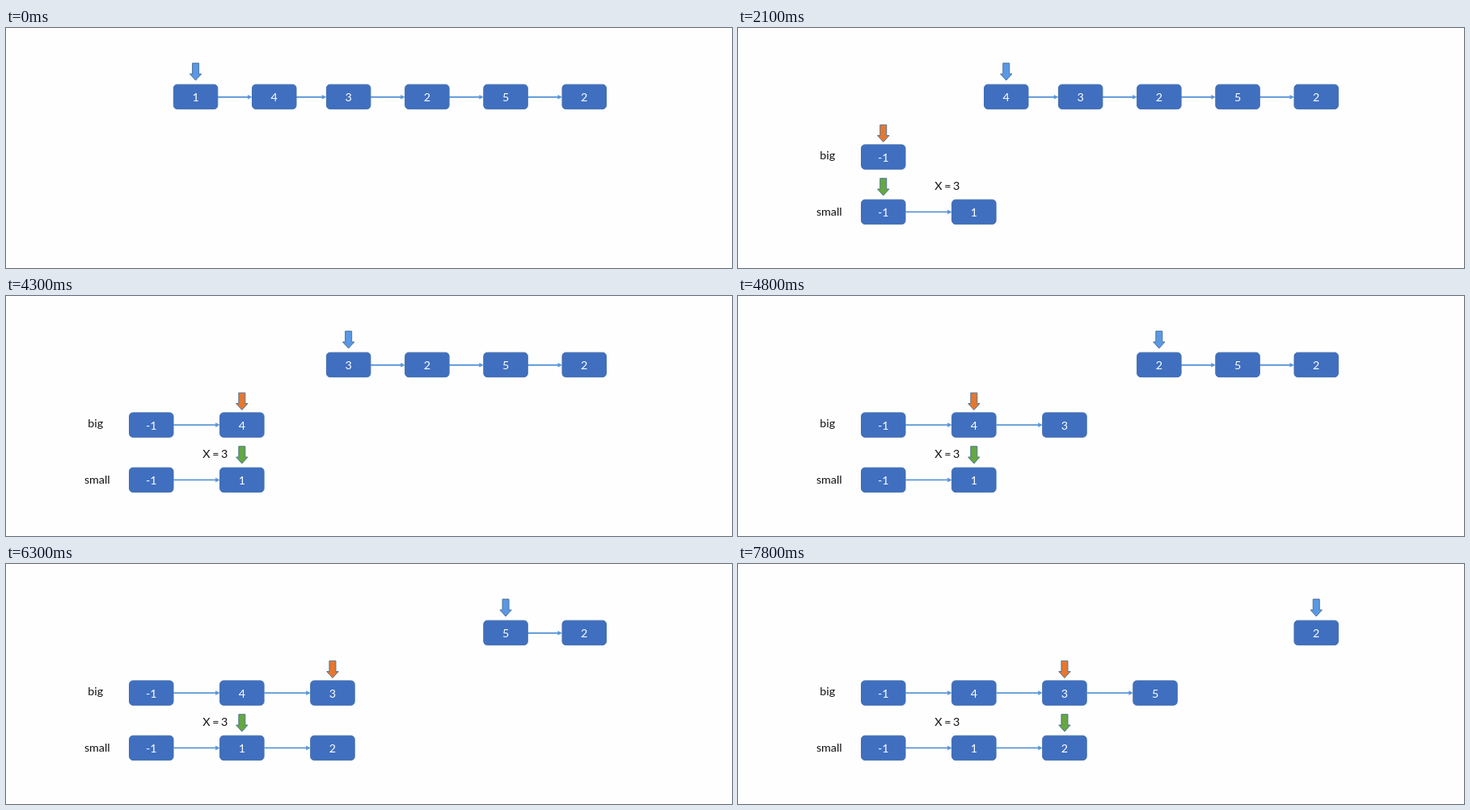
An HTML page that plays this animation: 898 px wide and 298 px high, repeating every 8 s.

```html
<!DOCTYPE html>
<html lang="en">
<head>
<meta charset="utf-8">
<title>Partition list</title>
<style>
  html, body { margin: 0; width: 100%; height: 100%; overflow: hidden; background: #fefefe; }
  svg { display: block; width: 898px; height: 298px; }
  text { font: 14.3px Lato, Roboto, sans-serif; word-spacing: -1px; text-anchor: middle; fill: #111; }
  .node rect { fill: #406fbf; stroke: #426fae; }
  .node text { fill: #fff; }
  .link line { stroke: #5b97d6; stroke-width: 1.9; }
  .link path { fill: #5b97d6; }
  .pointer { stroke: #4f7598; }
</style>
</head>
<body>
<svg id="stage" viewBox="0 0 898 298"></svg>
<script>
const LOOP = 8000, SETUP = 400, PIVOT = 3;
const values = [1, 4, 3, 2, 5, 2];
const moves = [2100, 3500, 4800, 6300, 7800];
const NODE_W = 54.5, NODE_H = 30.4;

const stage = document.getElementById('stage');
const parts = [];

function add(parent, tag, attrs = {}, text = '') {
  const el = document.createElementNS('http://www.w3.org/2000/svg', tag);
  for (const key in attrs) el.setAttribute(key, attrs[key]);
  el.textContent = text;
  return parent.appendChild(el);
}

// Visible while from <= t < to
function group(cls, from, to = LOOP) {
  const el = add(stage, 'g', { class: cls });
  parts.push({ el, from, to });
  return el;
}

function node(value, x, y, from, to) {
  const g = group('node', from, to);
  add(g, 'rect', { x, y, width: NODE_W, height: NODE_H, rx: 4.5 });
  add(g, 'text', { x: x + NODE_W / 2, y: y + 20.6 }, value);
}

function link(x1, x2, y, from, to) {
  const g = group('link', from, to);
  add(g, 'line', { x1, y1: y, x2: x2 - 4, y2: y });
  add(g, 'path', { d: `M${x2 - 5.5} ${y - 2.8}L${x2} ${y}l-5.5 2.8z` });
}

function label(text, x, y) {
  add(group('label', SETUP), 'text', { x, y }, text);
}

// Down arrow centred above the node at x
function pointer(fill, x, y, from, to) {
  add(group('pointer', from, to), 'path', {
    fill, d: `M${x + NODE_W / 2 - 4} ${y}h8v13.3h3.2l-7.2 8l-7.2 -8h3.2z`
  });
}

const inputX = i => 207.3 + 97.2 * i - (i > 1 ? 5.3 : 0);
const rowX = i => 152.5 + 112.1 * i;

// Input list: the head leaves at each move, and its pointer goes on to the next node
const INPUT_Y = 70.2;
values.forEach((value, i) => {
  const x = inputX(i), leave = moves[i];
  if (i < values.length - 1) link(x + NODE_W, inputX(i + 1), INPUT_Y + 15.5, 0, leave);
  node(value, x, INPUT_Y, 0, leave);
  pointer('#5a98e4', x, 43.7, i ? moves[i - 1] : 0, leave);
});

// Each output pointer follows its new node after part of the pause, on a 100 ms clock
function followTime(i) {
  const pause = (moves[i + 1] ?? Infinity) - moves[i];
  return moves[i] + Math.floor(pause * 0.65 / 100) * 100;
}

function row(y, color, pointerY, accepts) {
  const items = [{ value: -1, arrive: SETUP, follow: SETUP }];
  moves.forEach((arrive, i) => {
    if (accepts(values[i])) items.push({ value: values[i], arrive, follow: followTime(i) });
  });
  items.forEach(({ value, arrive, follow }, i) => {
    const x = rowX(i);
    if (i) link(rowX(i - 1) + NODE_W, x, y + 15.2, arrive);
    node(value, x, y, arrive);
    pointer(color, x, pointerY, follow, items[i + 1]?.follow);
  });
}
row(144.9, '#e6772f', 120.2, v => v >= PIVOT);
row(213.2, '#64a83e', 186.7, v => v < PIVOT);

label('big', 110.8, 162.6);
label('small', 112.8, 232.8);
label(`X = ${PIVOT}`, 258.8, 200.5);

const start = performance.now();
function draw() {
  const t = (performance.now() - start) % LOOP;
  for (const { el, from, to } of parts) {
    el.setAttribute('visibility', t >= from && t < to ? 'visible' : 'hidden');
  }
  requestAnimationFrame(draw);
}
draw();
</script>
</body>
</html>
```
